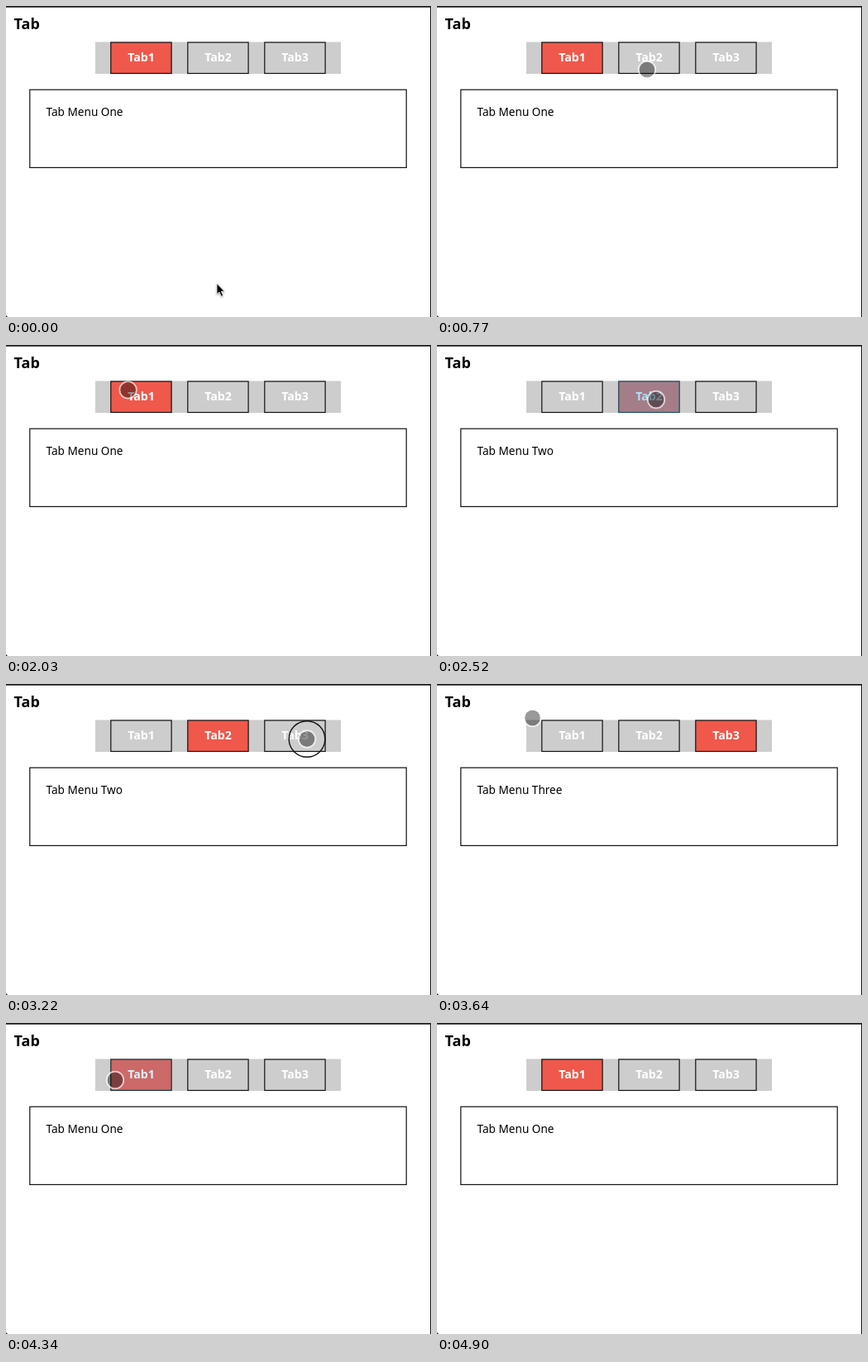
These frames come from a looping animation (514x376 px, 5110 ms). An HTML page:

```html
<!DOCTYPE html>
<html lang="en">
<head>
<meta charset="utf-8">
<title>Tab</title>
<style>
  html, body { margin: 0; width: 100%; height: 100%; overflow: hidden; background: #fff; }
  svg { display: block; width: 514px; height: 376px; font-family: "Noto Sans", sans-serif; }
  .box { fill: #cdcdcd; stroke: #111; stroke-width: 1.2; }
  .active .box { fill: #ef584b; }
  .tab text { fill: #fff; font-size: 14.2px; font-weight: 700; text-anchor: middle; }
  .tap { fill: rgb(51, 181, 229); }
</style>
</head>
<body>
<svg viewBox="0 0 514 376">
  <path d="M0 0H514V376H513V1.7H0ZM0 374L2 376H0Z" fill="#1c1a1c"/>
  <text x="9.6" y="27.5" font-size="18" font-weight="700">Tab</text>
  <rect x="108" y="43.5" width="297" height="38.5" fill="#cdcdcd"/>
  <g id="tabs"></g>
  <rect x="28.8" y="101.2" width="455.4" height="94.2" fill="none" stroke="#111" stroke-width="1.2"/>
  <text id="panel" x="48.5" y="133.3" font-size="13.6"></text>
  <path id="arrow" d="M255 335.5V348.5L258 345.8L260.4 351L262.6 350L260.3 345H264.3Z"
    stroke="#fff" stroke-width=".8" style="filter: drop-shadow(0 1px 1px #0006)"/>
  <g id="touch">
    <circle r="9.5" fill-opacity=".4"/>
    <circle r="10.3" fill="none" stroke="#fff" stroke-opacity=".65" stroke-width="1.8"/>
    <circle id="ring" r="21.8" fill="none" stroke="#111" stroke-width="1.4"/>
  </g>
</svg>
<script>
const LOOP = 5110, STEP = 70;
const names = ["One", "Two", "Three"];
const taps = [{ time: 2520, tab: 1 }, { time: 3290, tab: 2 }, { time: 4270, tab: 0 }];

// Pointer strokes: start, end, target and, for curves, two Bézier handles.
// Without handles the stroke is straight and eases in and out.
const strokes = [
  { from: 420, until: 770, to: [254, 77] },
  { from: 840, until: 1470, to: [196, 124], bend: [[140, 115], [126, 244]] },
  { from: 1470, until: 1960, to: [134, 53], bend: [[205, 90], [160, 60]] },
  { from: 1960, until: 2310, to: [265, 66] },
  { from: 2590, until: 3150, to: [364, 66.5] },
  { from: 3290, until: 3640, to: [115.5, 41] },
  { from: 3640, until: 4130, to: [132, 69], bend: [[95, 45], [190, 80]] },
  { from: 4340, until: 4620, to: [271, 359] },
  { from: 4620, until: 4900, to: [271, 390] }
];

const $ = id => document.getElementById(id);
const show = (el, on) => el.setAttribute("visibility", on ? "visible" : "hidden");

$("tabs").innerHTML = names.map((_, i) => `
  <g class="tab" transform="translate(${126.8 + 93 * i} 44)">
    <rect class="box" width="73.3" height="37.5"/>
    <text x="36.8" y="22.8">Tab${i + 1}</text>
    <rect class="tap" x="-.5" y="-.5" width="74.3" height="38.5"/>
  </g>`).join("");
const tabs = [...document.querySelectorAll(".tab")];

const bezier = (a, b, c, d, u) => {
  const v = 1 - u;
  return v * v * v * a + 3 * v * v * u * b + 3 * v * u * u * c + u * u * u * d;
};

function pointerAt(t) {
  let pos = [189, 82];
  for (const { from, until, to, bend = [pos, to] } of strokes) {
    if (t < from) break;
    const u = Math.min(1, (t - from) / (until - from));
    pos = pos.map((p, i) => bezier(p, bend[0][i], bend[1][i], to[i], u));
  }
  return pos;
}

function draw(t) {
  const last = taps.filter(tap => tap.time <= t).pop() || { time: -LOOP, tab: 0 };
  const glow = Math.max(0, 0.4 - 0.22 * (t - last.time) / STEP);
  tabs.forEach((tab, i) => {
    const active = i === last.tab;
    tab.classList.toggle("active", active);
    tab.querySelector(".tap").setAttribute("fill-opacity", active ? glow : 0);
  });
  $("panel").textContent = "Tab Menu " + names[last.tab];

  const touching = t >= strokes[0].from && t < 4900;
  $("touch").setAttribute("transform", `translate(${pointerAt(t)})`);
  show($("arrow"), t < STEP);
  show($("touch"), touching);
  show($("ring"), taps.some(({ time }) => t < time && t >= time - STEP));
}

const start = performance.now();
function frame() {
  const t = (performance.now() - start) % LOOP;
  draw(Math.floor(t / STEP) * STEP);
  requestAnimationFrame(frame);
}
frame();
</script>
</body>
</html>
```
